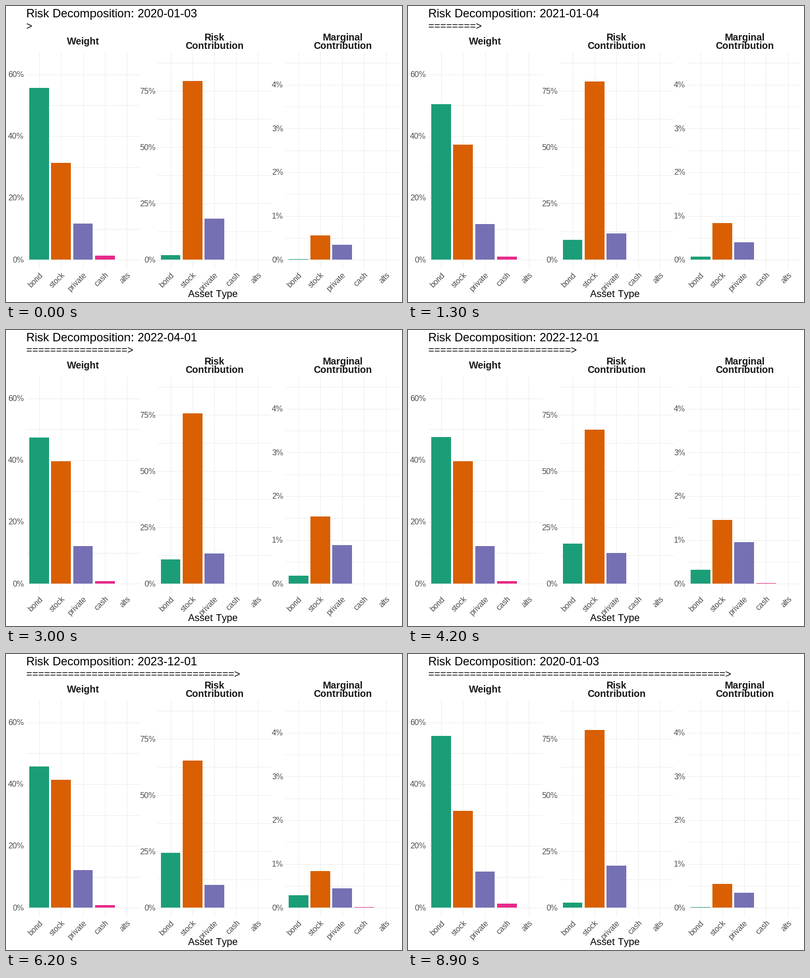
Write a matplotlib script that moves like this. It is 800 by 600 pixels and loops after 10000 ms.

```python
import numpy as np
import matplotlib.pyplot as plt
from matplotlib.animation import FuncAnimation
from matplotlib.patches import Rectangle

plt.rcParams.update({
    "font.family": "Liberation Sans",
    "text.hinting": "native",
    "text.hinting_factor": 1,    # whole-pixel glyph advances
    "text.kerning_factor": 16,   # no pair kerning
})

W, H, DPI = 800, 600, 100
FRAMES, LAST, TURN = 100, 89, 77
ASSETS = ["bond", "stock", "private", "cash", "alts"]
COLORS = ["#1B9E77", "#D95F02", "#7570B3", "#E7298A", "#66A61E"]
TOP, ZERO, BOTTOM = 92.5, 514.45, 533
STEP = 230 / 5.2

# left edge, pixels per percent, major step, highest grid value, strip text
PANELS = [
    (40.5, 6.265, 20, 60, ["Weight"]),
    (306, 4.56, 25, 87.5, ["Risk", "Contribution"]),
    (564.2, 88.7, 1, 4.5, ["Marginal", "Contribution"]),
]

# Key poses; the last one closes the loop
POSE_AT = [0, 13, 30, 42, 62, TURN, LAST]
MONTH = [0, 12, 27, 35, 47, 56, 63]
BOND_W = [55.55, 50.3, 47.25, 47.4, 45.65, 43.9, 55.55]
BOND_M = [.0086, .07, .184, .32, .285, .137, .0086]
STOCK_M = [.544, .838, 1.535, 1.465, .838, 1.005, .544]
PRIVATE_M = [.341, .4, .89, .95, .442, .575, .341]

HOLIDAYS = [f"{y}-01-01" for y in range(2020, 2026)]
HOLIDAYS += ["2020-01-02", "2023-01-02", "2024-09-02"]

fig = plt.figure(figsize=(W / DPI, H / DPI), dpi=DPI, facecolor="white")
ax = fig.add_axes([0, 0, 1, 1])
ax.set(xlim=(0, W), ylim=(H, 0))
ax.axis("off")


def label(x, y, text, px, color="black", **kw):
    return ax.text(x, y, text, fontsize=px * 72 / DPI, color=color,
                   va="baseline", **kw)


def line(xs, ys):
    ax.plot(xs, ys, color="#EBEBEB", lw=72 / DPI, solid_capstyle="butt", zorder=1)


def center(left, k):
    return left + (0.6 + k) * STEP


def draw_panel(left, scale, step, top_value, strip):
    for v in np.arange(0, top_value + step / 4, step / 2):
        y = ZERO - v * scale
        line([left, left + 230], [y, y])
        if v % step == 0:
            label(round(left) - 4, round(y + 5.3), f"{v:.0f}%", 16, "#4D4D4D",
                  ha="right")
    for k, name in enumerate(ASSETS):
        x = center(left, k)
        line([x, x], [TOP, BOTTOM])
        label(x + 8.2, 546, name, 16, "#4D4D4D", ha="right",
              rotation=45, rotation_mode="anchor")
    base = 78 - 8 * (len(strip) - 1)
    for i, text in enumerate(strip):
        label(left + 115.7, base + 17 * i, text, 20, "#1A1A1A",
              ha="center", weight="bold")


def make_bars(left):
    bars = [Rectangle((center(left, k) - 0.45 * STEP, ZERO), 0.9 * STEP, 0,
                      lw=0, fc=color, zorder=2) for k, color in enumerate(COLORS)]
    for bar in bars:
        ax.add_patch(bar)
    return bars


for panel in PANELS:
    draw_panel(*panel)
rows = [make_bars(panel[0]) for panel in PANELS]
label(418, 590, "Asset Type", 20, ha="center")
title = label(41, 23, "", 24)
progress = label(41, 47, "", 20)


def state(f):
    """Weight, risk share and marginal risk in percent."""
    back = max(0, (f - TURN) / (LAST - TURN)) ** 4
    t = min(f, TURN) + (LAST - TURN) * back
    shock = np.exp(-((f - 3) / 1.3) ** 2)
    alts = np.clip((f - 63) / 3, 0, 1) * (1 - back)

    bond = np.interp(t, POSE_AT, BOND_W) + 10 * shock
    private = np.interp(t, [0, 13, 30, TURN, LAST], [11.8, 11.5, 12.2, 12.1, 11.8])
    cash = 0.8 + 0.47 * (np.exp(-f / 12) + back)
    stock = 100 - bond - private - cash - 0.2 * alts
    weight = np.array([bond, stock, private, cash, 0.2 * alts])

    marginal = np.array([
        np.interp(t, POSE_AT, BOND_M),
        np.interp(t, POSE_AT, STOCK_M) + 3.9 * shock,
        np.interp(t, POSE_AT, PRIVATE_M) + 0.9 * shock,
        0.018 * max(0, np.sin(np.pi * (f - 28) / 40)),
        2 * alts,
    ])
    risk = weight * marginal
    return weight, 100 * risk / risk.sum(), marginal


def trading_day(f):
    month = int(np.interp(f, POSE_AT, MONTH)) % MONTH[-1]
    start = (np.datetime64("2020-01") + month).astype("datetime64[D]")
    return np.busday_offset(start, 0, roll="forward", holidays=HOLIDAYS)


def update(i):
    f = min(i, LAST)
    title.set_text(f"Risk Decomposition: {trading_day(f)}")
    progress.set_text("=" * int(f * 50 / LAST + 0.72) + ">")
    for bars, values, panel in zip(rows, state(f), PANELS):
        for bar, height in zip(bars, values * panel[1]):
            bar.set_visible(height >= 0.5)
            bar.set_height(-max(height, 1))
    return [title, progress] + sum(rows, [])


anim = FuncAnimation(fig, update, frames=FRAMES, interval=100,
                     repeat=True, repeat_delay=0)
plt.show()
```
